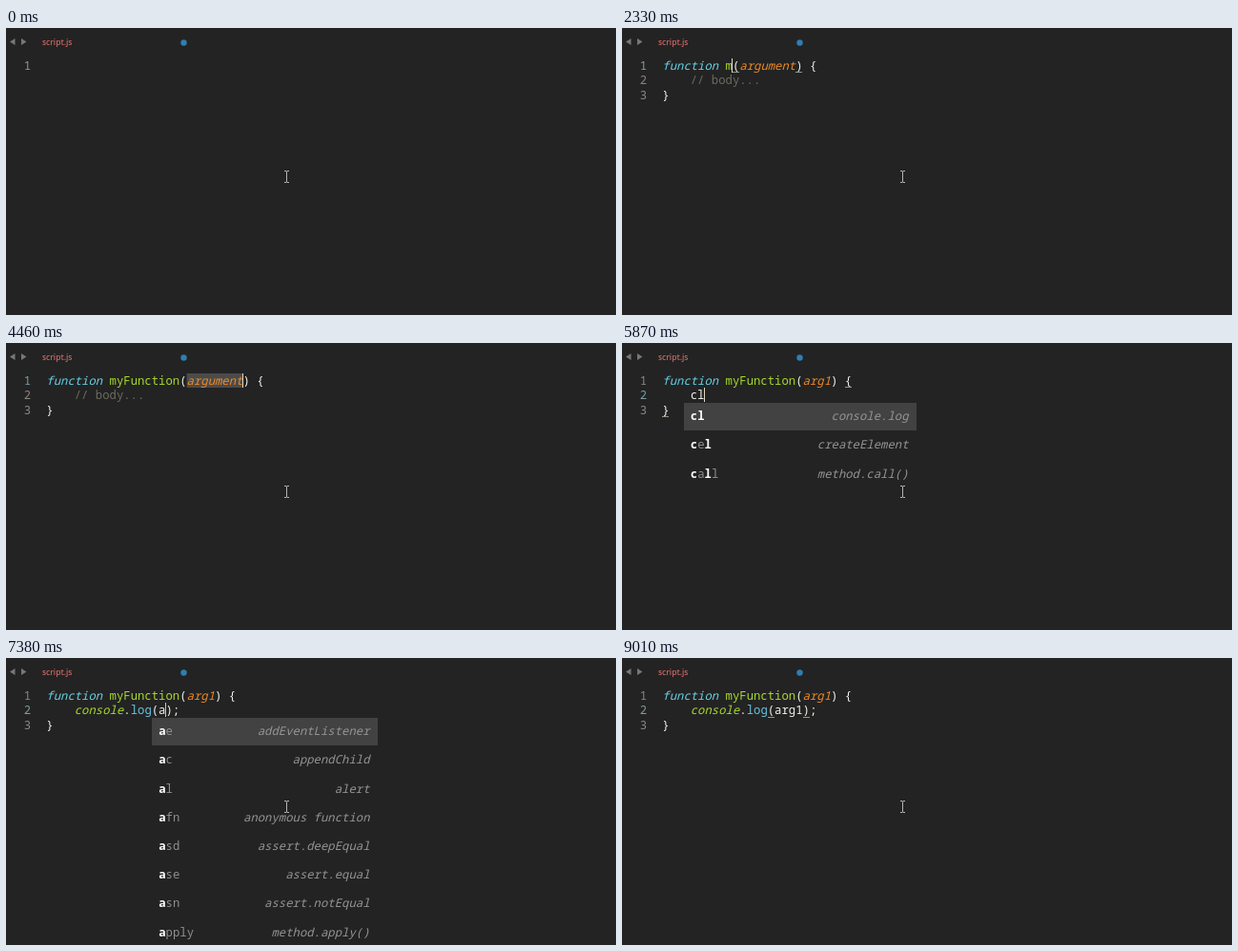
Animation of 640x302 px, one loop 9.11 s. Source, as an HTML page:

```html
<!DOCTYPE html>
<html lang="en">
<head>
<meta charset="utf-8">
<title>Snippet demo</title>
<style>
  html, body { margin: 0; width: 100%; height: 100%; overflow: hidden; background: #232323; }
  svg { display: block; width: 100vw; height: 100vh; }
  text { font: 500 12.28px "Noto Sans Mono", monospace; fill: #f2f2ec; white-space: pre; }
  .tab { font: 600 8.4px "Open Sans", sans-serif; fill: #cb6664; }
  .num { fill: #8a8782; text-anchor: end; }
  .num.on { fill: #7a9c9e; }
  .key { fill: #66d0e4; font-style: italic; }
  .call { fill: #66c4e4; }
  .name { fill: #a6d92e; }
  .obj { fill: #a6d92e; font-style: italic; }
  .arg { fill: #ec8a26; font-style: italic; }
  .note { fill: #6c6a5f; }
  .hit { fill: #fff; font-weight: 700; }
  .miss { fill: #8d918f; }
  .desc { fill: #949494; font-style: italic; text-anchor: end; }
</style>
</head>
<body>
<svg viewBox="0 0 640 302" preserveAspectRatio="none">
  <rect width="640" height="302" fill="#232323"/>
  <path d="M9.5 11v7L4 14.500zM16 11v7l5.500-3.500z" fill="#777"/>
  <text class="tab" x="38" y="18">script.js</text>
  <circle cx="186.500" cy="15.500" r="3.200" fill="#2d7fb3"/>
  <g id="editor"></g>
  <path d="M292 150.500h2l.5.5.5-.5h2M294.500 151v11M292 162.500h2l.5-.5.5.5h2" fill="none" stroke="#b4b4b4"/>
</svg>
<script>
const LOOP = 9110, LEFT = 42.3, CHAR = 7.368, LINE = 15.5, ROW = 30.2;
const editor = document.getElementById('editor');
const colX = col => LEFT + col * CHAR;

// A line is a list of [class, text] runs.
const plain = text => [[['', text]]];
const note = [['note', '    // body...']];
const log = arg => [['', '    '], ['obj', 'console'], ['', '.'], ['call', 'log'], ['', `(${arg});`]];
const func = (name, arg, body = note) => [
  [['key', 'function'], ['', ' '], ['name', name], ['', '('], ['arg', arg], ['', ') {']],
  body,
  [['', '}']]
];
const popup = (line, col, typed, rows, width = 244, bar = 0) => ({ line, col, typed, rows, width, bar });

const funRow = ['fun', 'Function'];
const fRows = [
  ['f', 'Anonymous Function'], ['fe', 'forEach'], ['fi', 'for in loop'], ['fl', 'for loop'],
  ['for', 'for (…) {…}'], ['for', 'for (…) {…} (Improved Native For-Loop)'], funRow
];
const clRows = [['cl', 'console.log'], ['cel', 'createElement'], ['call', 'method.call()']];
const aRows = [
  ['ae', 'addEventListener'], ['ac', 'appendChild'], ['al', 'alert'], ['afn', 'anonymous function'],
  ['asd', 'assert.deepEqual'], ['ase', 'assert.equal'], ['asn', 'assert.notEqual'], ['apply', 'method.apply()']
];

// match: 0 or 1 = parentheses on that line, 'body' = the braces.
const start = { lines: plain(''), caret: [0, 0], blink: 0, match: null, sel: null, pop: null };
const steps = [];
const at = (time, change) => steps.push([time, { blink: 1, ...change }]);
const fade = (time, blink) => at(time, { blink });
const typeName = (time, name) =>
  at(time, { lines: func(name, 'argument'), caret: [0, 9 + name.length], match: 0, sel: null, pop: null });
const typeArg = (time, arg, match) =>
  at(time, { lines: func('myFunction', arg), caret: [0, 20 + arg.length], match, sel: null });
const typeBody = (time, text, pop) =>
  at(time, { lines: func('myFunction', 'arg1', [['', '    ' + text]]), caret: [1, 4 + text.length], match: 'body', sel: null, pop });
const typeLog = (time, arg, pop) =>
  at(time, { lines: func('myFunction', 'arg1', log(arg)), caret: [1, 16 + arg.length], match: 1, pop });

at(370, { lines: plain('f'), caret: [0, 1] });
at(500, { pop: popup(0, 0, 'f', fRows, 319) });
at(640, { lines: plain('fu'), caret: [0, 2], pop: popup(0, 0, 'fu', [funRow]) });
at(920, { lines: plain('fun'), caret: [0, 3], pop: popup(0, 0, 'fun', [funRow]) });
fade(1170, .85);
fade(1300, .6);
fade(1420, .2);
at(1550, { lines: func('function_name', 'argument'), caret: [0, 22], sel: [0, 9, 22], pop: null });
fade(1820, .5);
fade(1940, 0);

typeName(2330, 'm');
at(2450, { pop: popup(0, 9, 'm', [['me', 'module.exports']]) });
[[2700, 'my'], [2830, 'myF'], [2960, 'myFu'], [3210, 'myFun'], [3340, 'myFunc'],
 [3590, 'myFunct'], [3710, 'myFuncti'], [3840, 'myFunctio'], [3970, 'myFunction']]
  .forEach(([time, name]) => typeName(time, name));

at(4460, { caret: [0, 28], sel: [0, 20, 28], match: null });
typeArg(4580, 'a', null);
typeArg(4720, 'ar', 0);
typeArg(4850, 'arg', 0);
typeArg(5080, 'arg1', 0);

at(5470, { caret: [1, 14], sel: [1, 4, 14], match: null });
typeBody(5730, 'c', null);
typeBody(5870, 'cl', popup(1, 4, 'cl', clRows));

typeLog(6240, '', null);
fade(6360, .8);
fade(6480, .4);
fade(6600, 0);
typeLog(6880, 'a', null);
at(7000, { pop: popup(1, 16, 'a', aRows, 244, 7) });
fade(7260, .85);
fade(7380, .9);
fade(7500, .4);
fade(7630, 0);
typeLog(7750, 'ar', popup(1, 16, 'ar', [['arg1', '']]));
typeLog(7870, 'arg', popup(1, 16, 'arg', [['arg1', '']]));
typeLog(8010, 'arg1', popup(1, 16, 'arg1', [['arg1', '']]));
at(8140, { pop: null });
fade(8360, .6);
fade(8490, .3);
fade(8620, 0);

const rect = (x, y, w, h, fill, opacity = 1) =>
  `<rect x="${x}" y="${y}" width="${w}" height="${h}" fill="${fill}" opacity="${opacity}"/>`;
const text = (x, y, content, cls = '') => `<text class="${cls}" x="${x}" y="${y}">${content}</text>`;
const span = ([cls, content]) => `<tspan class="${cls}">${content}</tspan>`;

function brackets({ lines, match }) {
  if (match === null) return [];
  const raw = lines.map(line => line.map(run => run[1]).join(''));
  return match === 'body'
    ? [[0, raw[0].indexOf('{')], [2, 0]]
    : [[match, raw[match].indexOf('(')], [match, raw[match].indexOf(')')]];
}

function drawPopup({ line, col, typed, rows, width, bar }) {
  const x = Math.round(colX(col) - 6.8), top = Math.round(47 + line * LINE);
  const inner = width - bar;
  let out = rect(x, top - 1, width, rows.length * ROW + 1, '#232323') + rect(x, top, inner, 29, '#424242');
  rows.forEach(([trigger, desc], i) => {
    const y = 65.6 + line * LINE + i * ROW;
    let next = 0;
    const letters = [...trigger].map(c => span(c === typed[next] ? (next++, ['hit', c]) : ['miss', c])).join('');
    out += text(colX(col), y, letters) + text(x + inner - 8.5, y, desc, 'desc');
  });
  return out;
}

function draw(state) {
  const { lines, caret, blink, sel, pop } = state;
  let out = '';
  if (sel) out += rect(colX(sel[1]), 32 + sel[0] * LINE, (sel[2] - sel[1]) * CHAR, 15, '#4b4b4b');
  lines.forEach((line, i) => {
    const y = 43.6 + i * LINE;
    out += text(26, y, i + 1, i === caret[0] ? 'num on' : 'num');
    out += text(LEFT, y, line.map(span).join(''));
  });
  for (const [line, col] of brackets(state))
    out += rect(Math.round(colX(col)), Math.round(46 + line * LINE), 7, 1, '#90988a');
  out += rect(Math.floor(colX(caret[1])), Math.floor(32 + caret[0] * LINE), 1, 15, '#e0d8c0', blink);
  if (pop) out += drawPopup(pop);
  editor.innerHTML = out;
}

let shown = -1;
function tick() {
  const now = performance.now() % LOOP;
  const count = steps.filter(([time]) => time <= now).length;
  if (count !== shown) {
    shown = count;
    draw(Object.assign({}, start, ...steps.slice(0, count).map(step => step[1])));
  }
  requestAnimationFrame(tick);
}
tick();
</script>
</body>
</html>
```
